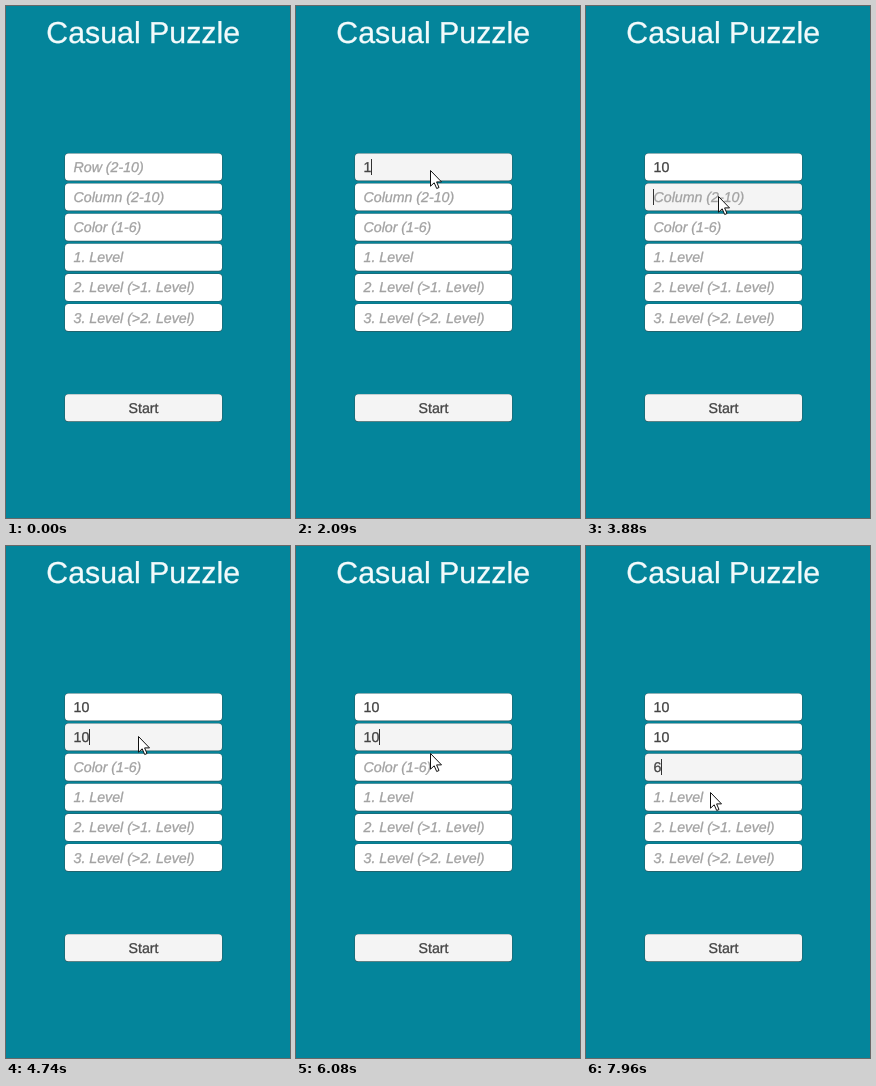
An HTML page with a canvas that plays this animation: 284 by 512 pixels, repeating every 8 s.

```html
<!DOCTYPE html>
<html lang="en">
<head>
<meta charset="utf-8">
<title>Puzzle setup</title>
<style>
html, body { margin: 0; width: 100%; height: 100%; overflow: hidden; background: #04859b; }
canvas { display: block; }
</style>
</head>
<body>
<canvas id="stage" width="284" height="512"></canvas>
<script>
const ctx = document.getElementById('stage').getContext('2d');
const LOOP = 8000, STEP = 80, BLINK = 585;
const TOP = 147.5, PITCH = 30.1;
const FONT = '"Liberation Sans", Arial, sans-serif';
const labels = ['Row (2-10)', 'Column (2-10)', 'Color (1-6)',
  '1. Level', '2. Level (>1. Level)', '3. Level (>2. Level)'];

const entry = { x: 300, y: 322 };
const moves = [
  { at: 380, steps: 2, x: 176, y: 220 },
  { at: 690, steps: 2, x: 122, y: 160 },
  { at: 1550, steps: 2, x: 134, y: 164 },
  { at: 3480, steps: 3, x: 132, y: 190 },
  { at: 5360, steps: 3, x: 104, y: 160 },
  { at: 5680, steps: 3, x: 139, y: 191 },
  { at: 6000, steps: 3, x: 132, y: 215 },
  { at: 6710, steps: 2, x: 132, y: 224 },
  { at: 7960, steps: 1, x: 124, y: 246 }
];
const clicks = [1000, 3720, 5600, 5920, 6400];
const keys = [[2090, '1'], [2480, '0'], [4040, '1'], [4740, '0'], [7730, '6']];

const fieldAt = y => Math.floor((y - TOP - 1) / PITCH);
const lastClick = t => clicks.filter(c => c <= t).pop();

// The pointer advances linearly in steps, like a sampled screen
function pointer(t) {
  const i = moves.filter(m => m.at <= t).length - 1;
  if (i < 0) return null;
  const to = moves[i], from = moves[i - 1] || entry;
  const p = Math.min(1, (Math.floor((t - to.at) / STEP) + 1) / to.steps);
  return {
    x: Math.round(from.x + (to.x - from.x) * p),
    y: Math.round(from.y + (to.y - from.y) * p)
  };
}

function focusAt(t) {
  const click = lastClick(t);
  return click === undefined ? -1 : fieldAt(pointer(click).y);
}

function box(y, color) {
  ctx.fillStyle = '#2b5a60';
  ctx.beginPath();
  ctx.roundRect(58.5, y - 0.3, 158, 28, 4);
  ctx.fill();
  ctx.fillStyle = color;
  ctx.beginPath();
  ctx.roundRect(59, y, 157, 27, 3.5);
  ctx.fill();
}

function write(text, x, y, color, font, align = 'left') {
  ctx.font = font + ' ' + FONT;
  ctx.fontKerning = 'none';
  ctx.textRendering = 'geometricPrecision';
  ctx.textAlign = align;
  ctx.fillStyle = ctx.strokeStyle = color;
  ctx.lineWidth = 0.3;
  ctx.fillText(text, x, y);
  ctx.strokeText(text, x, y);
}

function drawPointer({ x, y }, pressed) {
  if (pressed) {
    ctx.fillStyle = 'rgba(246,242,70,.78)';
    ctx.beginPath();
    ctx.arc(x, y, 15, 0, Math.PI * 2);
    ctx.fill();
  }
  const arrow = new Path2D('M.5 .5V16.2L4.2 12.8L6.7 18.5L9 17.5L6.6 11.9H11.5Z');
  ctx.save();
  ctx.translate(x, y);
  ctx.fillStyle = '#fff';
  ctx.strokeStyle = '#111';
  ctx.lineWidth = 1;
  ctx.fill(arrow);
  ctx.stroke(arrow);
  ctx.restore();
}

function draw(t) {
  const focus = focusAt(t);
  const pressed = t - lastClick(t) < STEP;
  const fading = focusAt(t - STEP);
  const tip = pointer(t), trail = pointer(t - STEP);
  const hover = t >= clicks[0] ? fieldAt(trail.y) : -1;
  const typed = keys.filter(([at]) => at <= t);
  const lastInput = Math.max(lastClick(t) || 0, ...typed.map(([at]) => at));
  const caretOn = (t - lastInput) % (2 * BLINK) < BLINK;

  ctx.fillStyle = '#04859b';
  ctx.fillRect(0, 0, 284, 512);
  write('Casual Puzzle', 137.2, 37, '#f2fafb', '30.3px', 'center');

  labels.forEach((label, i) => {
    const y = TOP + i * PITCH;
    const lit = [focus, fading, hover].includes(i);
    box(y, pressed && i === focus ? '#f0eef0' : lit ? '#f4f4f4' : '#fff');
    const value = typed.filter(([at]) => focusAt(at) === i).map(k => k[1]).join('');
    if (value) write(value, 67.5, y + 18.5, '#444', '14.2px');
    else write(label, 67.5, y + 18.5, '#a2a2a2', 'italic 14.2px');
    if (i === focus && caretOn) {
      ctx.fillStyle = '#323232';
      ctx.fillRect(67 + value.length * 8, 153 + i * 30, 1, 16);
    }
  });

  box(388.3, '#f4f4f4');
  write('Start', 137.5, 407, '#444', '14.2px', 'center');
  if (tip) drawPointer(tip, pressed);
}

function tick() {
  draw(performance.now() % LOOP);
  requestAnimationFrame(tick);
}
tick();
</script>
</body>
</html>
```
